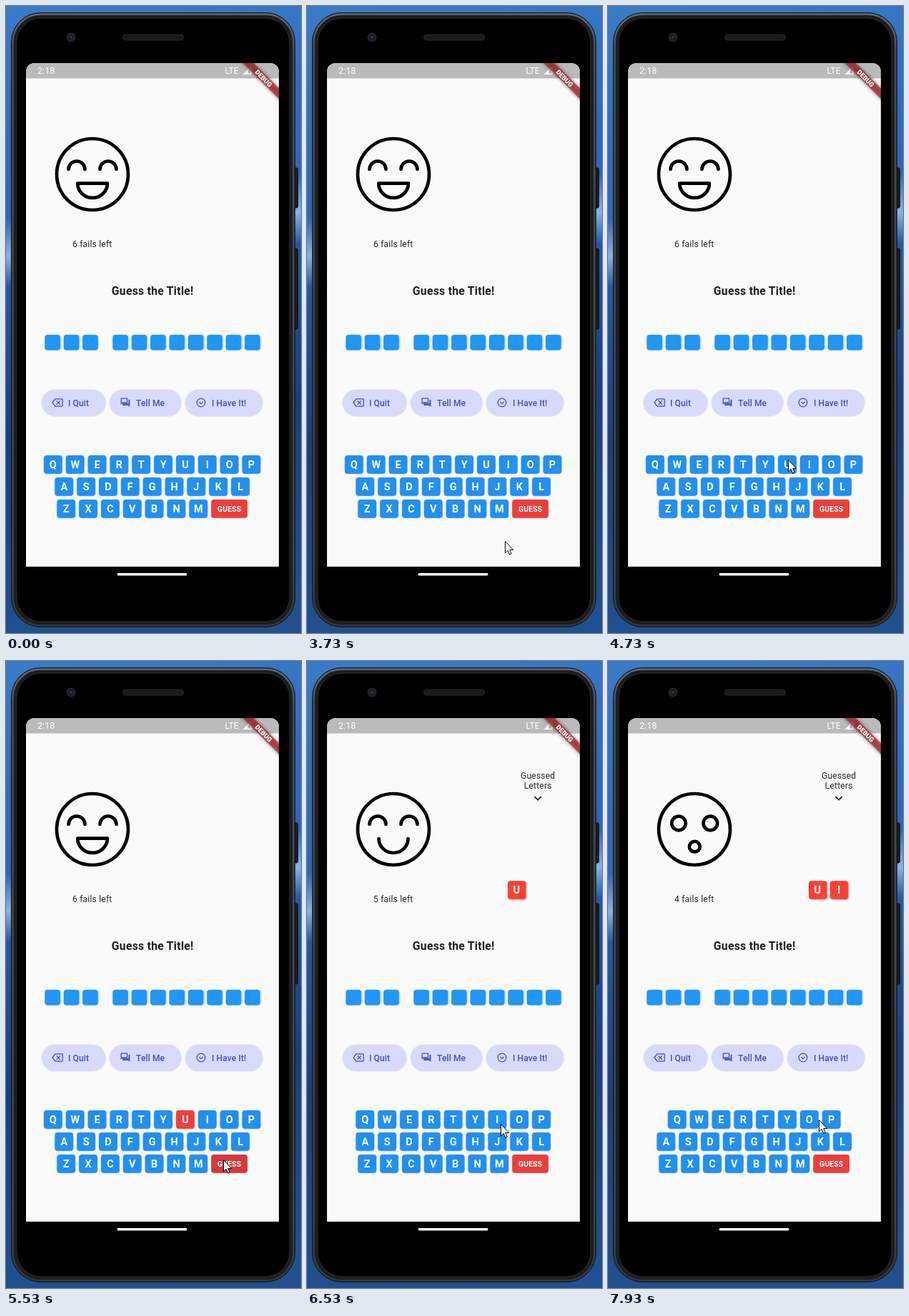
These frames come from a looping animation (413 px wide and 879 px high, 8 s). An HTML page:

```html
<!DOCTYPE html>
<html lang="en">
<head>
<meta charset="utf-8">
<title>Guess the Title</title>
<style>
html, body { margin: 0; width: 100%; height: 100%; overflow: hidden; background: #2d68b5; }
svg { display: block; width: 100%; height: 100%; font-family: Roboto, sans-serif; }
.body { font-size: 12.05px; letter-spacing: .2px; fill: #242424; }
.title { font-size: 15.8px; font-weight: 700; letter-spacing: .25px; fill: #1f1f1f; }
.label { font-size: 12.05px; font-weight: 500; letter-spacing: .1px; fill: #3f51b5; }
.key { font-size: 14.5px; font-weight: 700; fill: #fff; text-anchor: middle; }
.guess { font-size: 10.4px; font-weight: 700; letter-spacing: .15px; fill: #fff; text-anchor: middle; }
.mid { text-anchor: middle; }
.ink { fill: none; stroke: #000; stroke-width: 4.7; stroke-linecap: round; stroke-linejoin: round; }
.icon { fill: none; stroke: #3f51b5; stroke-width: 2; stroke-linejoin: round; }
.raised { filter: drop-shadow(.4px .8px .8px rgba(0, 0, 0, .24)); }
.tiles { filter: drop-shadow(1px .8px .8px rgba(33, 110, 190, .4)); }
.reds { filter: drop-shadow(1.2px 1.2px .9px rgba(150, 30, 30, .5)); }
</style>
</head>
<body>
<svg viewBox="0 0 413 879" preserveAspectRatio="none">
  <defs>
    <linearGradient id="sky" gradientUnits="userSpaceOnUse" x1="0" y1="0" x2="130" y2="858">
      <stop offset="0" stop-color="#3a7cc9"/>
      <stop offset=".2" stop-color="#2e6dc0"/>
      <stop offset=".34" stop-color="#2a67bd"/>
      <stop offset=".4" stop-color="#86b3e6"/>
      <stop offset=".45" stop-color="#2258a8"/>
      <stop offset=".7" stop-color="#173f7e"/>
      <stop offset="1" stop-color="#20508f"/>
    </linearGradient>
    <linearGradient id="rim" gradientUnits="userSpaceOnUse" x1="0" y1="9" x2="0" y2="871">
      <stop offset="0" stop-color="#6a6c70"/>
      <stop offset=".06" stop-color="#4a4c50"/>
      <stop offset=".9" stop-color="#3f4144"/>
      <stop offset="1" stop-color="#35373a"/>
    </linearGradient>
    <radialGradient id="lens">
      <stop offset="0" stop-color="#3a4254"/>
      <stop offset=".45" stop-color="#181c24"/>
      <stop offset="1" stop-color="#26282c"/>
    </radialGradient>
    <clipPath id="screen"><path d="M28 786V92a12 12 0 0 1 12-12H370a12 12 0 0 1 12 12V786z"/></clipPath>
    <filter id="soft" x="-20%" y="-80%" width="140%" height="260%"><feGaussianBlur stdDeviation="2.4"/></filter>
  </defs>

  <rect width="413" height="879" fill="url(#sky)"/>
  <g fill="#1b1c1f" stroke="#08090a">
    <rect x="402" y="227" width="6.5" height="56" rx="2"/>
    <rect x="402" y="340" width="6.5" height="113" rx="2"/>
  </g>
  <rect x="7.5" y="9.5" width="397" height="861" rx="41" fill="#1c1d1f" stroke="#101113"/>
  <rect x="9.500" y="11.500" width="393" height="857" rx="39" fill="none" stroke="url(#rim)" stroke-width="2.600"/>
  <rect x="15" y="17" width="382" height="846" rx="34" fill="#000" stroke="#2c2d30"/>
  <circle cx="91" cy="44" r="6.5" fill="url(#lens)"/>
  <rect x="163.5" y="40" width="85" height="8" rx="4" fill="#1b1b1c" stroke="#28292b"/>
  <rect x="155.5" y="795" width="98" height="3.4" rx="1.7" fill="#fff"/>

  <g clip-path="url(#screen)">
    <rect x="28" y="80" width="354" height="706" fill="#fafafa"/>
    <rect x="28" y="80" width="354" height="21.5" fill="#bababa"/>
    <g fill="#fff" font-size="12.6">
      <text x="44" y="95">2:18</text>
      <text x="306.5" y="94.8" font-size="12.2">LTE</text>
      <path d="M333 95.400L343 85.400V95.400z" fill="none" stroke="#fff" stroke-width="1.300"/>
      <path d="M333 95.400L338.500 89.900V95.400z"/>
    </g>
    <circle class="ink" cx="121" cy="236" r="50"/>
    <text class="title" x="147.800" y="405">Guess the Title!</text>
    <g id="tiles" class="tiles" fill="#2196f3"></g>
    <g id="pills"></g>
    <g id="game"></g>
    <g transform="translate(382 80) rotate(45)">
      <rect x="-40" y="25" width="80" height="10.6" opacity=".5" filter="url(#soft)"/>
      <rect x="-40" y="25" width="80" height="10.6" fill="#b71c1c" opacity=".63"/>
      <text y="33.500" font-size="9.200" font-weight="900" fill="#fff" class="mid">DEBUG</text>
    </g>
  </g>
  <path id="cursor" d="M0 0V16.300l3.700-3.500 2.500 5.800 2.500-1.100-2.400-5.600H11.300z" fill="#fff" stroke="#000" stroke-linejoin="round"/>
</svg>
<script>
const LOOP = 8000, STEP = 1000 / 15;
const BLUE = '#2190f0', RED = '#ec3f3c', PRESSED = '#d43a3a';
const KEY = 25.8, PITCH = 30.85, CENTER = 204.7;
const $ = id => document.getElementById(id);

const box = (x, y, w, h, r, fill) =>
  `<rect x="${x}" y="${y}" width="${w}" height="${h}" rx="${r}"${fill ? ` fill="${fill}"` : ''}/>`;
const text = (cls, x, y, s) => `<text class="${cls}" x="${x}" y="${y}">${s}</text>`;
const ink = d => `<path class="ink" d="${d}"/>`;
const ring = (x, y, r) => `<circle class="ink" cx="${x}" cy="${y}" r="${r}"/>`;

// Title squares: a word of three and a word of eight
const word = (x, n) => Array.from({ length: n }, (_, i) => box(x + i * 26.4, 461, 21.6, 21.6, 4)).join('');
$('tiles').innerHTML = word(54.3, 3) + word(149.3, 8);

const pills = [
  [50.5, 88.5, 72, 87, 'I Quit', 'M7 4h15a1 1 0 0 1 1 1v14a1 1 0 0 1-1 1H7L1.200 12zM10 8l8 8m0-8l-8 8'],
  [145.5, 99.5, 167, 182, 'Tell Me', 'M3 3h13v9H5.500L3 14.500zM20 6.500h1v13L18.500 17H7v-2.500H20z'],
  [251.5, 107.5, 273, 288, 'I Have It!', 'M3 12a9 9 0 0 1 18 0a9 9 0 0 1-18 0M8 10.500l4 4 4-4']
];
$('pills').innerHTML = pills.map(([x, w, ix, tx, s, d]) =>
  `<g class="raised">${box(x, 538.5, w, 36, 18, '#d8dafc')}</g>` +
  `<path class="icon" d="${d}" transform="translate(${ix - 7.75} 548.250) scale(.646)"/>` +
  text('label', tx, 560.5, s)).join('');

const happyEyes = ink('M87.500 229a11.500 11.500 0 0 1 23 0M131.500 229a11.500 11.500 0 0 1 23 0');
const faces = [
  happyEyes + ink('M100.300 248.700H141.900a20.800 20.200 0 0 1-41.600 0z'),
  happyEyes + ink('M100.500 249a20.500 20 0 0 0 41 0'),
  ring(99, 227.5, 9.8) + ring(143.3, 227.5, 9.8) + ring(121.3, 260.3, 7.4)
];

// [time, letters already guessed, selected letter, guess key held]
const states = [
  [0, '', '', false],
  [4867, '', 'U', false],
  [5467, '', 'U', true],
  [5667, 'U', '', false],
  [6933, 'U', 'I', false],
  [7467, 'U', 'I', true],
  [7600, 'UI', '', false]
];

function keyRow(letters, y, picked, extra = 0) {
  const n = letters.length;
  const x0 = CENTER - (n * PITCH - (PITCH - KEY) + extra) / 2;
  const keys = [...letters].map((c, i) => {
    const x = x0 + i * PITCH;
    return box(x, y, KEY, KEY, 4, c === picked ? RED : BLUE) + text('key', x + KEY / 2, y + 18, c);
  }).join('');
  return { keys, end: x0 + n * PITCH };
}

function drawGame([, used, picked, held]) {
  const top = [...'QWERTYUIOP'].filter(c => !used.includes(c)).join('');
  const last = keyRow('ZXCVBNM', 692, picked, 55.8);
  const rows = keyRow(top, 630, picked).keys + keyRow('ASDFGHJKL', 661, picked).keys + last.keys +
    box(last.end, 692, 50.7, KEY, 4, held ? PRESSED : RED) + text('guess', last.end + 25.4, 708.5, 'GUESS');
  let html = faces[used.length] + text('body', 93, 338, `${6 - used.length} fails left`) +
    `<g class="raised">${rows}</g>`;
  if (used) {
    html += text('body mid', 323.2, 164.6, 'Guessed') + text('body mid', 323.2, 179, 'Letters') +
      '<path d="M318.500 190.200l4.600 4.500 4.600-4.500" fill="none" stroke="#222" stroke-width="1.800"/>' +
      '<g class="reds">' + [...used].map((c, i) => box(281 + i * 29.8, 308.3, 25.4, 25.4, 4, '#f44336')).join('') + '</g>' +
      [...used].map((c, i) => text('key', 293.3 + i * 29.8, 326.2, c)).join('');
  }
  $('game').innerHTML = html;
}

// Pointer tip: [time, x, y], eased between rows
const path = [
  [133, 420, 890], [600, 277.5, 767.5], [800, 277.5, 767.5], [933, 277.5, 753.5],
  [3667, 277.5, 753.5], [3733, 277.5, 750.5], [4133, 265.5, 660.5],
  [4400, 265.5, 660.5], [4733, 252.5, 636.5], [4933, 252.5, 636.5],
  [5333, 304.5, 704.5], [5400, 304.5, 704.5], [5533, 304.5, 699.5], [5733, 304.5, 699.5],
  [5933, 296.5, 690.5], [6000, 296.5, 690.5], [6533, 271.5, 649.5], [6733, 263.5, 645.5],
  [6933, 263.5, 645.5], [7400, 306.5, 707.5], [7733, 305.5, 699.5], [7933, 295.5, 643.5]
];
const ease = p => p * p * (3 - 2 * p);

function tipAt(t) {
  const i = path.findIndex(k => k[0] > t);
  if (i < 0) return path[path.length - 1].slice(1);
  if (i === 0) return path[0].slice(1);
  const [t0, x0, y0] = path[i - 1], [t1, x1, y1] = path[i];
  const p = ease((t - t0) / (t1 - t0));
  return [x0 + (x1 - x0) * p, y0 + (y1 - y0) * p];
}

let shown = -1;
function frame() {
  const t = Math.floor((performance.now() % LOOP + 4) / STEP) * STEP + 0.5;
  const n = states.filter(s => s[0] <= t).length - 1;
  if (n !== shown) drawGame(states[shown = n]);
  const [x, y] = tipAt(t);
  $('cursor').setAttribute('transform', `translate(${x} ${y})`);
  $('cursor').setAttribute('visibility', t < 199 ? 'hidden' : 'visible');
  requestAnimationFrame(frame);
}
frame();
</script>
</body>
</html>
```
